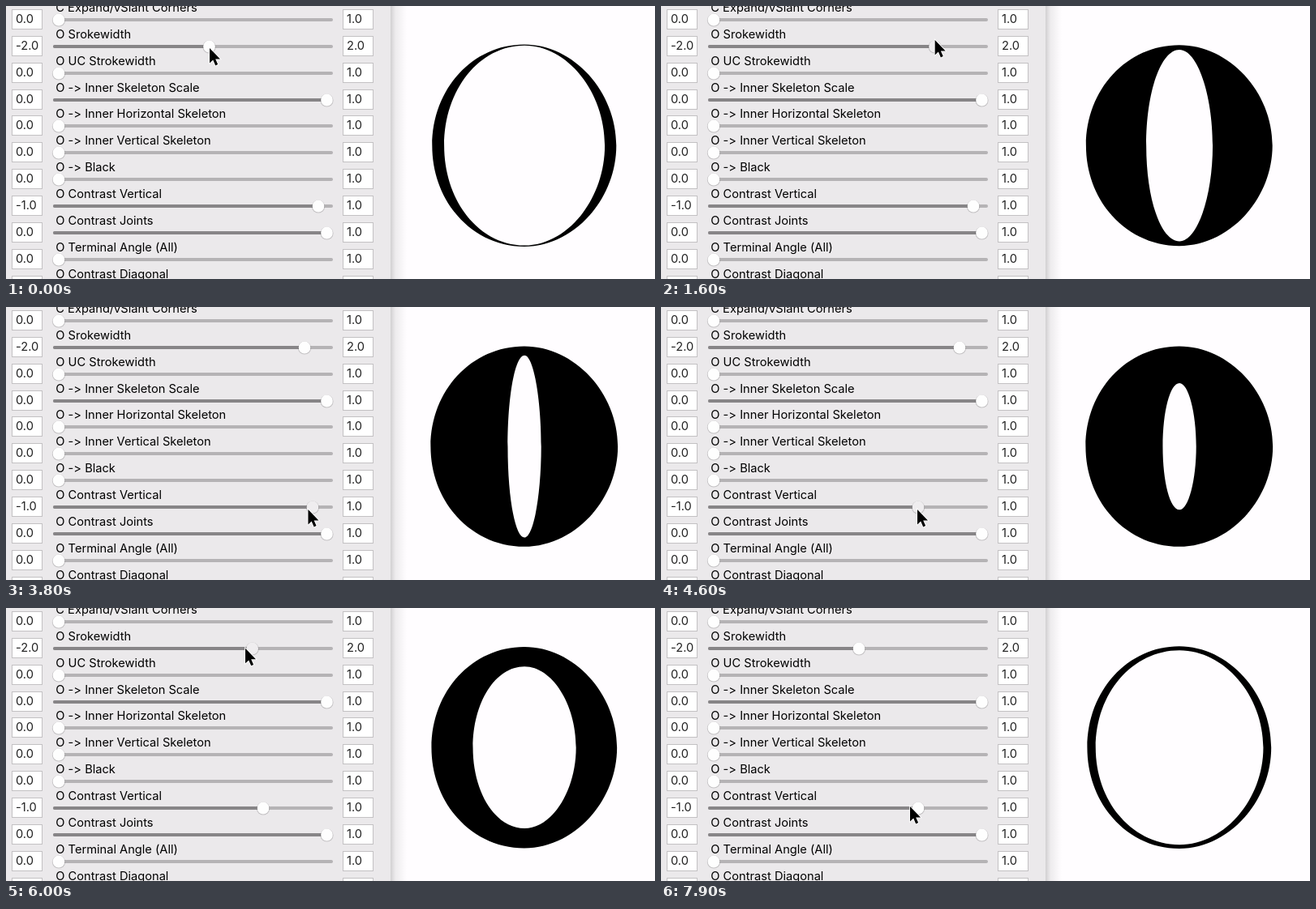
Recreate the animation shown at these times as an HTML page. Size 800x337 px, loop 8 s.

```html
<!DOCTYPE html>
<html lang="en">
<head>
<meta charset="utf-8">
<title>Slider panel</title>
<style>
  html, body { margin: 0; width: 100%; height: 100%; overflow: hidden; background: #fffdff; }
  svg { display: block; width: 100%; height: 100%; }
  text { font: 14.65px Inter, "Open Sans", sans-serif; font-variant-ligatures: none; font-feature-settings: "calt" 0; }
  .num { fill: #222; }
</style>
</head>
<body>
<svg viewBox="0 0 800 337">
  <defs>
    <linearGradient id="shade">
      <stop offset="0" stop-color="#000" stop-opacity=".18"/>
      <stop offset=".3" stop-color="#000" stop-opacity=".07"/>
      <stop offset="1" stop-color="#000" stop-opacity="0"/>
    </linearGradient>
  </defs>
  <rect x="474" width="20" height="337" fill="url(#shade)"/>
  <rect width="474" height="337" fill="#ebe9eb"/>
  <g id="panel"></g>
  <path id="glyph" fill-rule="evenodd"/>
  <path id="cursor" d="M0 0V18.5L4.2 14.6 7.2 21.4 10.1 20.1 7.2 13.4H13Z"
    stroke="#fff" stroke-width="1.6" paint-order="stroke"/>
</svg>
<script>
const $ = id => document.getElementById(id);
const LOOP = 8000, STEP = 100;
const LOW = 65, HIGH = 395.5;
const STROKE = 1, CONTRAST = 7;   // rows that are dragged
const FULL = [3, 8];              // rows that rest at their maximum
const RANGES = { [STROKE]: ['-2.0', '2.0'], [CONTRAST]: ['-1.0', '1.0'] };
const LABELS = [
  'C Expand/vSlant Corners', 'O Srokewidth', 'O UC Strokewidth', 'O -> Inner Skeleton Scale',
  'O -> Inner Horizontal Skeleton', 'O -> Inner Vertical Skeleton', 'O -> Black',
  'O Contrast Vertical', 'O Contrast Joints', 'O Terminal Angle (All)', 'O Contrast Diagonal'
];

function add(tag, attrs, text) {
  const el = document.createElementNS('http://www.w3.org/2000/svg', tag);
  for (const name in attrs) el.setAttribute(name, attrs[name]);
  if (text) el.textContent = text;
  return $('panel').appendChild(el);
}

function numberBox(x, y, value) {
  add('rect', { x: x + .5, y: y - 12.5, width: 37, height: 24, fill: '#fff', stroke: '#c3c1c3' });
  add('text', { x: x + 5, y: y + 4.2, class: 'num' }, value);
}

function slider(label, i) {
  const y = Math.round(16.8 + 32.92 * i);
  const [min, max] = RANGES[i] || ['0.0', '1.0'];
  const bar = (width, fill) => add('rect', { x: 58, y: y - 2, width, height: 4, rx: 2, fill });
  add('text', { x: 61.3, y: y - 10.2 }, label);
  numberBox(7, y, min);
  numberBox(415, y, max);
  bar(345, '#b5b3b5');
  const fill = bar(0, '#878587');
  const shadow = add('circle', { cy: y + .5, r: 8.1, 'fill-opacity': .17 });
  const knob = add('circle', { cy: y, r: 7.4 });
  const set = (x, pressed) => {
    fill.setAttribute('width', x > LOW ? x - 58 : 0);
    shadow.setAttribute('cx', x);
    knob.setAttribute('cx', x);
    knob.setAttribute('fill', pressed ? '#efedef' : '#fefefe');
  };
  set(FULL.includes(i) ? HIGH : LOW);
  return set;
}

const sliders = LABELS.map(slider);

const part = (t, from, to) => Math.min(1, Math.max(0, (t - from) / (to - from)));
const bump = (t, from, to) => Math.sin(Math.PI * part(t, from, to));
function ease(t, from, to) {
  const u = part(t, from, to);
  return u * u * (3 - 2 * u);
}

// The right half is a little flatter on its diagonals than the left.
function oval(cx, cy, rx, ry, left = .56, right = .535) {
  const quarter = (sx, sy, k, out) => {
    const side = `${cx + sx * rx} ${cy + sy * ry * k}`, pole = `${cx + sx * rx * k} ${cy + sy * ry}`;
    return out ? `C${pole} ${side} ${cx + sx * rx} ${cy}` : `C${side} ${pole} ${cx} ${cy + sy * ry}`;
  };
  return `M${cx - rx} ${cy}` + quarter(-1, -1, left) + quarter(1, -1, right, true) +
    quarter(1, 1, right) + quarter(-1, 1, left, true) + 'Z';
}

function draw(now) {
  const t = Math.floor(now % LOOP / STEP) * STEP;

  // Drags of the two knobs, and the cursor's trips between them
  const widen = ease(t, 0, 2400), lower = ease(t, 3600, 4600), thin = ease(t, 5200, 6760);
  const down = ease(t, 2700, 2800), settle = ease(t, 2800, 3600);
  const up = ease(t, 4600, 5000), again = ease(t, 7200, 7600);

  const gain = 117.5 * widen - 124 * thin;
  const pressed = (from, to) => t >= from && t < to;
  sliders[STROKE](250.5 + gain, pressed(100, 2500) || pressed(5300, 7100));
  sliders[CONTRAST](385 - 68 * lower, pressed(3700, 4700));

  const innerY = 123.4 - .06 * gain - lower * (5.6 + .278 * gain);
  $('glyph').setAttribute('d',
    oval(638.8, 172.2, 113.5 + .016 * gain, 124.8 - .01 * gain) +
    oval(639.1, 172.2, 99 - .667 * gain, innerY));

  const x = 251 + 117 * widen + 7.5 * down + 3.5 * settle - 63 * lower + 40 * up - 117.5 * thin + 68.5 * again;
  const y = 52 - 13.5 * widen + 206 * down + 5.5 * settle - 196 * up - 8 * thin + 199 * again +
    15 * bump(t, 2800, 3600) + 52 * bump(t, 7300, 7900);
  $('cursor').setAttribute('transform', `translate(${x} ${y})`);
  requestAnimationFrame(draw);
}
requestAnimationFrame(draw);
</script>
</body>
</html>
```
